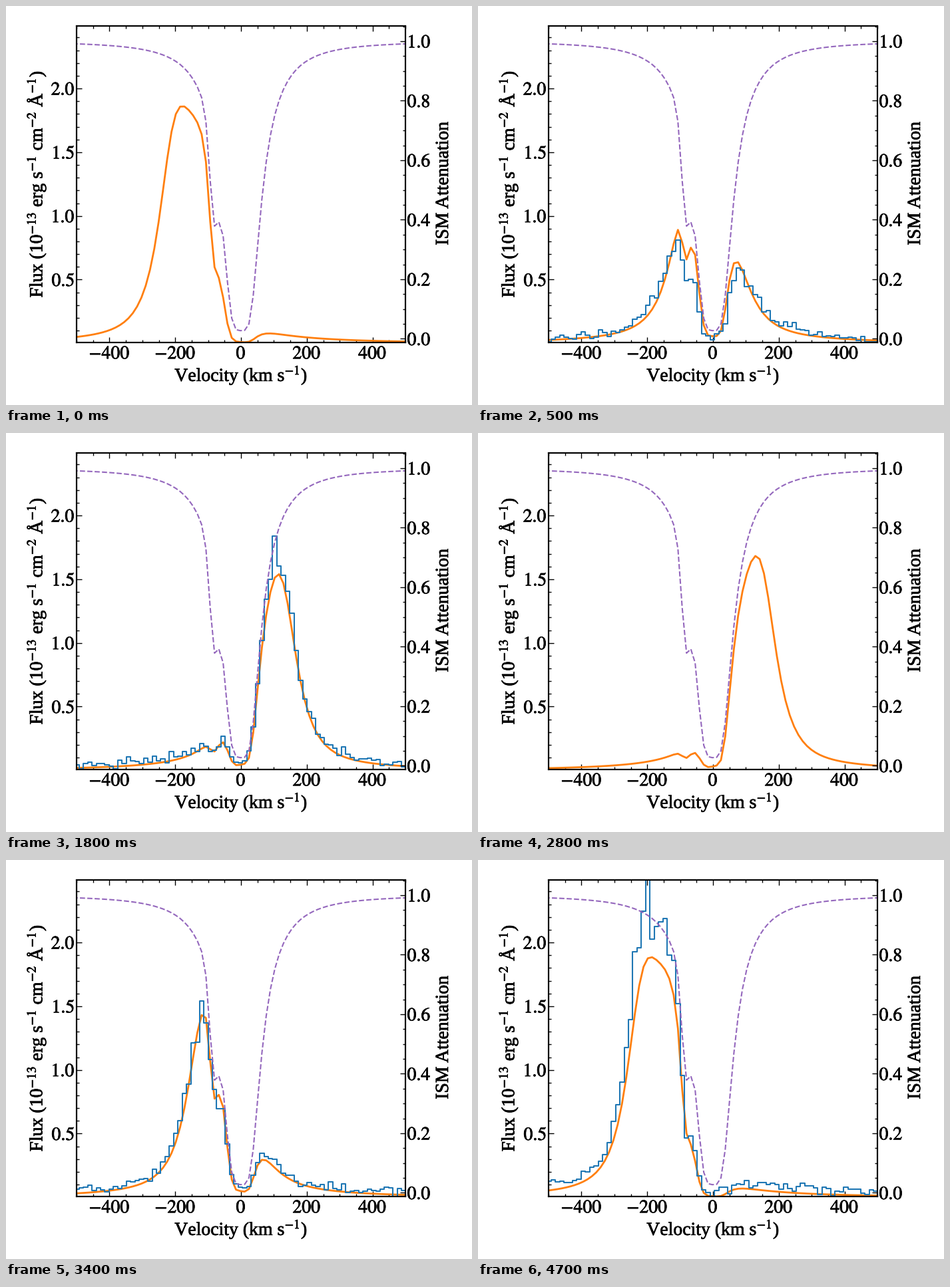
Recreate the animation shown at these times as a matplotlib script. Size 700 by 600 pixels, loop 5700 ms.

```python
import numpy as np
import matplotlib.pyplot as plt
from matplotlib.animation import FuncAnimation
from matplotlib.patheffects import withStroke
from matplotlib.ticker import AutoMinorLocator, FuncFormatter, MultipleLocator

W, H, DPI = 700, 600, 100
LEFT, RIGHT, TOP, BOTTOM = 106, 600, 30, 505.5
ORANGE, BLUE, PURPLE = "#ff7f0e", "#1f77b4", "#9467bd"
HEAVY = [withStroke(linewidth=0.5, foreground="black")]

plt.rcParams.update({
    "font.family": "Liberation Serif",
    "font.size": 20,
    "mathtext.fontset": "stix",
    "axes.linewidth": 1.5,
})

# Velocities of the detector pixels, km/s
VEL = -2 + 13.08 * np.arange(-39, 40)

# Orbital phase at key steps; the observed epochs bend the even pace
STEPS = 21
KEY_STEPS = [0, 5, 9, 10, 16, 17, 20]
KEY_PHASES = [-1.11, 0.10, 0.85, 1.23, 3.35, 3.44, 4.56]

# Observed epochs: step -> line gain, width, shift (km/s) and background
EPOCHS = {
    5: (0.68, 1.25, -2, 0.01),
    9: (1.10, 0.98, 0, 0.02),
    16: (0.97, 1.03, -2, 0.02),
    20: (1.20, 0.96, -5, 0.04),
}
HOLD = 10


def transmission(v):
    """Saturated interstellar line with damped wings plus a small blue cloud."""
    main = 3200 / np.hypot(v ** 2, 890) * (1 + (v / 150) ** 2) ** -0.15
    cloud = 0.5 * np.exp(-((v + 81) / 12) ** 2 / 2)
    return np.exp(-main - cloud)


ISM = transmission(VEL)


def line_centre(step):
    return -32 + 133 * np.sin(np.interp(step, KEY_STEPS, KEY_PHASES))


def line_flux(centre, gain=1, width=1):
    """Flat-topped emission line with Lorentzian wings, seen through the ISM."""
    d2 = ((VEL - centre) / width) ** 2
    return 2.05 * gain * ISM / (1 + 3.25e-4 * d2 * (1 - np.exp(-d2 / 24500)))


def observe(step):
    gain, width, shift, background = EPOCHS[step]
    flux = line_flux(line_centre(step) + shift, gain, width)
    noise = np.random.default_rng(step).normal(size=VEL.size)
    return flux + background + noise * (0.018 + 0.04 * flux)


spectra = {step: observe(step) for step in EPOCHS}
schedule = [s for s in range(STEPS) for _ in range(HOLD if s in EPOCHS else 1)]

fig = plt.figure(figsize=(W / DPI, H / DPI), dpi=DPI, facecolor="white")
ax = fig.add_axes([LEFT / W, 1 - BOTTOM / H,
                   (RIGHT - LEFT) / W, (BOTTOM - TOP) / H])
ax2 = ax.twinx()
ax.set(xlim=(-500, 500), ylim=(0.0094, 2.491))
ax2.set_ylim(-0.0112, 1.0514)


def style_axis(axis, step, fmt):
    axis.set_major_locator(MultipleLocator(step))
    axis.set_minor_locator(AutoMinorLocator())
    axis.set_major_formatter(FuncFormatter(lambda v, _: f"${v:{fmt}}$"))
    for text in axis.get_ticklabels():
        text.set_path_effects(HEAVY)


for a in (ax, ax2):
    a.tick_params(which="both", direction="in", width=1)
    a.tick_params(which="major", length=6)
    a.tick_params(which="minor", length=3)
    a.tick_params(axis="y", pad=1.8)
ax.tick_params(axis="x", which="both", top=True, pad=4.2)
style_axis(ax.xaxis, 200, ".0f")
style_axis(ax.yaxis, 0.5, ".1f")
style_axis(ax2.yaxis, 0.2, ".1f")


def label(x, y, text, angle=0):
    fig.text(x / W, 1 - y / H, text, rotation=angle, rotation_mode="anchor",
             ha="center", va="baseline", path_effects=HEAVY)


label(353, 564, "Velocity (km s$^{-1}$)")
label(54.5, 268, "Flux (10$^{-13}$ erg s$^{-1}$ cm$^{-2}$ Å$^{-1}$)", 90)
label(664, 267, "ISM Attenuation", 90)

ax2.plot(VEL, ISM, "--", color=PURPLE, lw=1.5)
model, = ax.plot([], [], color=ORANGE, lw=2)
data, = ax.plot([], [], color=BLUE, lw=1.5, drawstyle="steps-mid")


def update(i):
    step = schedule[i]
    model.set_data(VEL, line_flux(line_centre(step)))
    data.set_visible(step in spectra)
    if step in spectra:
        data.set_data(VEL, spectra[step])
    return model, data


anim = FuncAnimation(fig, update, frames=len(schedule), interval=100,
                     repeat=True, repeat_delay=0)
plt.show()
```
